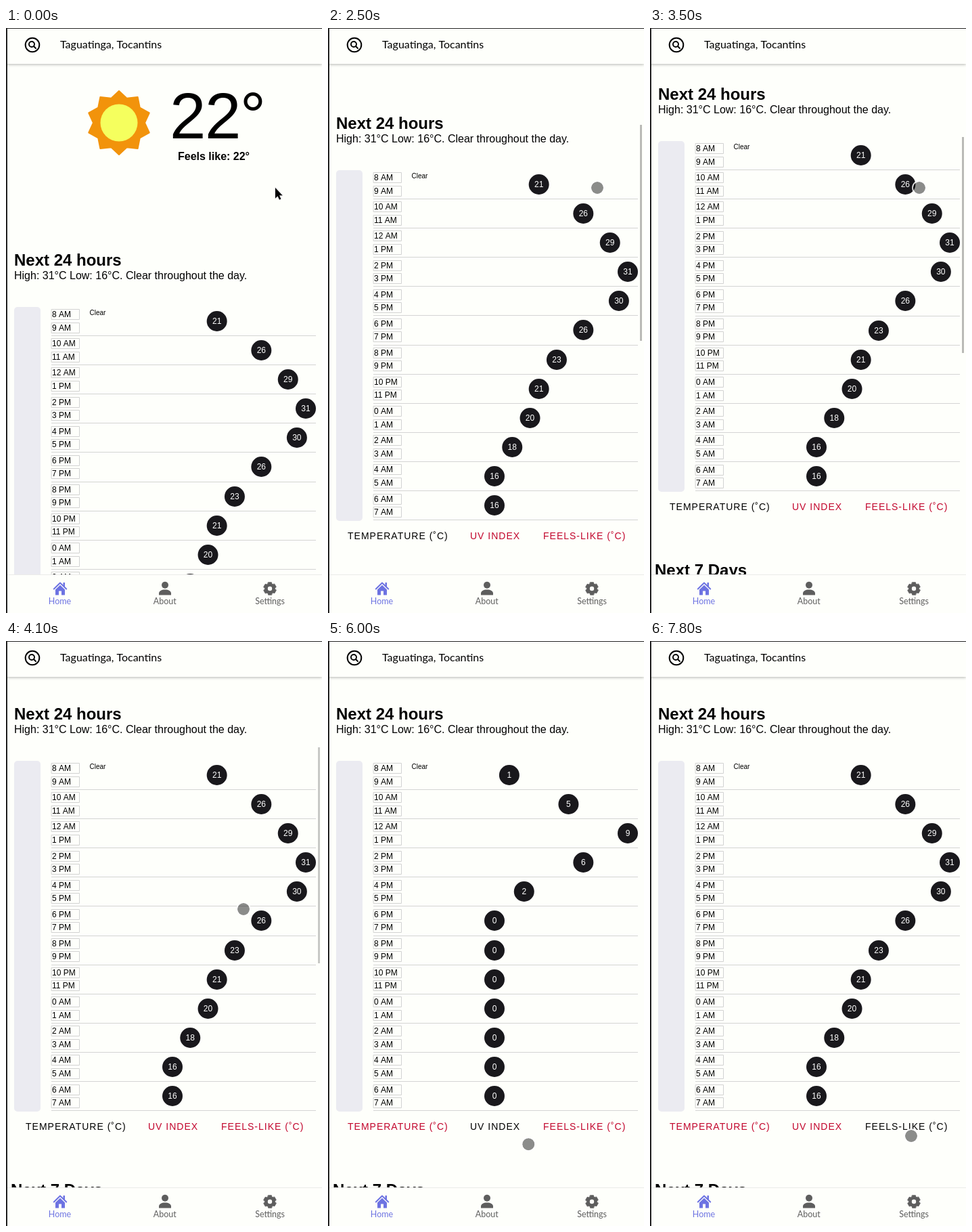
These frames come from a looping animation (467 px wide and 864 px high, 8000 ms). An HTML page with a canvas:

```html
<!DOCTYPE html>
<html lang="en">
<head>
<meta charset="utf-8">
<title>Weather</title>
<style>
  html, body { margin: 0; width: 100%; height: 100%; overflow: hidden; background: #fefffb; }
  canvas { display: block; }
</style>
</head>
<body>
<canvas id="stage" width="467" height="864"></canvas>
<script>
const ctx = document.getElementById('stage').getContext('2d');
const LOOP = 8000, STEP = 100;
const BG = '#fefffb', INK = '#000', DARK = '#19181c', RED = '#c2052c', BLUE = '#6d73e2', GREY = '#5e5e5e';
const SANS = '"Liberation Sans", Arial, sans-serif', LATO = 'Lato, sans-serif';
const ROWS = 12, ROW_HEIGHT = 43.125;

const temps = [21, 26, 29, 31, 30, 26, 23, 21, 20, 18, 16, 16];
const uv = temps.map((_, i) => [1, 5, 9, 6, 2][i] ?? 0);
const tabs = [
  { label: 'TEMPERATURE (˚C)', x: 29, values: temps, press: -Infinity },
  { label: 'UV INDEX', x: 210, values: uv, press: 5400 },
  { label: 'FEELS-LIKE (˚C)', x: 318, values: temps, press: 7100 }
];
const moves = [
  { start: 4000, end: 4200, x: 304, y: 556 },
  { start: 4300, end: 4700, x: 281, y: 698 },
  { start: 4800, end: 5000, x: 257, y: 721 },
  { start: 5600, end: 6200, x: 310, y: 751 },
  { start: 6200, end: 6800, x: 347, y: 727 },
  { start: 7200, end: 7800, x: 386, y: 731 }
];

const mix = (a, b, p) => a + (b - a) * p;
const progress = (t, start, end) => Math.max(0, Math.min(1, (t - start) / (end - start)));
const smooth = p => p * p * (3 - 2 * p);
const easeOut = p => 1 - (1 - p) ** 2;

const scrollAt = t =>
  Math.round(287 * smooth(progress(t, 2145, 2700)) - 52 * easeOut(progress(t, 3080, 3830)));

function pointerAt(t) {
  return moves.reduce((at, m) => {
    const p = smooth(progress(t, m.start, m.end));
    return { x: mix(at.x, m.x, p), y: mix(at.y, m.y, p) };
  }, { x: 398, y: 236 });
}

function text(str, x, y, font, color = INK, align = 'left', spacing = 0) {
  ctx.font = font;
  ctx.fillStyle = color;
  ctx.textAlign = align;
  ctx.letterSpacing = spacing + 'px';
  ctx.fillText(str, x, y);
  return ctx.measureText(str).width;
}

function rect(x, y, w, h, color, radius = 0) {
  ctx.beginPath();
  ctx.roundRect(x, y, w, h, radius);
  ctx.fillStyle = color;
  ctx.fill();
}

function disc(x, y, r, color) {
  ctx.beginPath();
  ctx.arc(x, y, r, 0, Math.PI * 2);
  ctx.fillStyle = color;
  ctx.fill();
}

function ring(x, y, r, width, color) {
  ctx.beginPath();
  ctx.arc(x, y, r, 0, Math.PI * 2);
  ctx.lineWidth = width;
  ctx.strokeStyle = color;
  ctx.stroke();
}

function shape(d, fill, stroke, width) {
  const path = new Path2D(d);
  ctx.lineJoin = ctx.lineCap = 'round';
  if (stroke) {
    ctx.strokeStyle = stroke;
    ctx.lineWidth = width;
    ctx.stroke(path);
  }
  if (fill) {
    ctx.fillStyle = fill;
    ctx.fill(path);
  }
}

function sun(x, y) {
  const points = Array.from({ length: 20 }, (_, i) => {
    const r = i % 2 ? 38 : 47, a = i * Math.PI / 10;
    return (x + r * Math.sin(a)) + ' ' + (y - r * Math.cos(a));
  });
  shape('M' + points.join('L') + 'Z', '#f2930b', '#f2930b', 2);
  disc(x, y, 27.5, '#f5ff5e');
}

function hourLabel(n) {
  const h = (8 + n) % 24;
  return h > 12 ? h - 12 + ' PM' : h + ' AM';
}

function hourBox(n, y) {
  ctx.strokeStyle = '#d2d2d2';
  ctx.lineWidth = 1;
  ctx.strokeRect(67.5, y - 7.5, 41, 15);
  text(hourLabel(n), 68, y + 4, '12px ' + SANS);
}

function dotX(values, i) {
  const min = Math.min(...values), max = Math.max(...values);
  return mix(246, 443, (values[i] - min) / (max - min));
}

function chart(t, active) {
  rect(12, 412, 39, 518, '#ebebf1', 5);
  text('Clear', 123.5, 424, '10px ' + SANS);
  const { values, press } = tabs[active];
  const before = tabs[Math.max(0, active - 1)].values;
  const p = smooth(progress(t, press + STEP, press + 550)) || 0;
  for (let i = 0; i < ROWS; i++) {
    const row = base => Math.round(base + ROW_HEIGHT * i);
    hourBox(2 * i, row(423.13));
    hourBox(2 * i + 1, row(442.55));
    rect(67, row(453.9), 391, 1, '#d4d4d4');
    const x = mix(dotX(before, i), dotX(values, i), p), y = row(432.8);
    disc(x, y, 15, DARK);
    text(values[i], x, y + 4, '12px ' + SANS, '#fff', 'center');
  }
}

// Press feedback: a disc grows from the pointer, clipped to the button.
function ripple(tab, width, t) {
  const age = t - tab.press;
  if (age < 0 || age > 500) return;
  const { x } = pointerAt(tab.press), left = tab.x - 8, right = tab.x + width + 8;
  const radius = Math.max(x - left, right - x) * Math.min(1, .4 + age / 400);
  ctx.save();
  ctx.beginPath();
  ctx.roundRect(left, 933.5, right - left, 36.5, 4);
  ctx.clip();
  disc(x, 960, radius, `rgba(220,0,50,${.045 * (1 - age / 500)})`);
  ctx.restore();
}

function content(t) {
  const active = tabs.filter(tab => t > tab.press).length - 1;
  ctx.save();
  ctx.translate(0, -scrollAt(t));
  sun(167, 140);
  text('22°', 242, 163, '96px ' + SANS, INK, 'left', -1.5);
  text('Feels like: 22°', 254, 195, 'bold 16px ' + SANS);
  text('Next 24 hours', 12, 351, 'bold 24px ' + SANS);
  text('High: 31°C Low: 16°C. Clear throughout the day.', 12, 371, '16px ' + SANS);
  chart(t, active);
  tabs.forEach((tab, i) => {
    const width = text(tab.label, tab.x, 957, '14px ' + SANS, i === active ? INK : RED, 'left', 1);
    ripple(tab, width, t);
  });
  text('Next 7 Days', 7, 1054, 'bold 24px ' + SANS);
  text('No precipitation throughout the week.', 7, 1074, '16px ' + SANS);
  ctx.restore();
}

function scrollbar(t) {
  const alpha = t < 2200 ? 0 : 1 - progress(t, 4000, 4450);
  rect(461, Math.round(56.6 + .4265 * scrollAt(t)), 3, 319, `rgba(0,0,0,${.27 * alpha})`);
}

function header() {
  ctx.save();
  ctx.shadowColor = 'rgba(0,0,0,.3)';
  ctx.shadowBlur = 4;
  ctx.shadowOffsetY = 1;
  rect(0, 0, 467, 53, BG);
  ctx.restore();
  ring(39, 25, 10.3, 2, INK);
  ring(38, 24, 4, 1.9, INK);
  shape('M41 27L44 30', null, INK, 2);
  text('Taguatinga, Tocantins', 80, 30, '16px ' + LATO);
}

function gear(x, y) {
  for (let i = 0; i < 6; i++) {
    ctx.save();
    ctx.translate(x, y);
    ctx.rotate(i * Math.PI / 3);
    shape('M-2.4 -9.3H2.4L3.6 -5H-3.6Z', GREY, GREY, .8);
    ctx.restore();
  }
  disc(x, y, 7.4, GREY);
  disc(x, y, 3.2, BG);
}

function nav() {
  rect(0, 807, 467, 57, BG);
  rect(0, 807, 467, 1, '#ebebe9');
  shape('M70.8 828.5L80 819.5L89.2 828.5', null, BLUE, 2);
  shape('M73 829.5L80 822.7L87 829.5V837.5H82V831.5H78V837.5H73ZM84.5 819H87V825H84.5Z', BLUE);
  disc(235, 822.8, 5, GREY);
  shape('M226 837.5V835C226 831.5 230 829.5 235 829.5S244 831.5 244 835V837.5Z', GREY);
  gear(390, 828);
  ['Home', 'About', 'Settings'].forEach((label, i) =>
    text(label, 79.5 + 155.3 * i, 851, '12.5px ' + LATO, i ? GREY : BLUE, 'center'));
}

function pointer(t) {
  const { x, y } = pointerAt(t);
  if (t < 500) {
    shape('M398 236V251.5L401.5 248.2L404 253.5L406.3 252.4L404 247.2H408.5Z', INK, '#ddd', 1.6);
    return;
  }
  disc(x, y, 9, 'rgba(0,0,0,.45)');
  ring(x, y, 10, 1.6, 'rgba(255,255,255,.9)');
}

function draw(t) {
  rect(0, 0, 467, 864, BG);
  content(t);
  scrollbar(t);
  header();
  nav();
  rect(0, 0, 2, 864, '#242424');
  rect(0, 0, 467, 1, '#242424');
  pointer(t);
}

const start = performance.now();
function frame() {
  const t = (performance.now() - start) % LOOP;
  draw(Math.floor(t / STEP) * STEP);
  requestAnimationFrame(frame);
}
frame();
</script>
</body>
</html>
```
